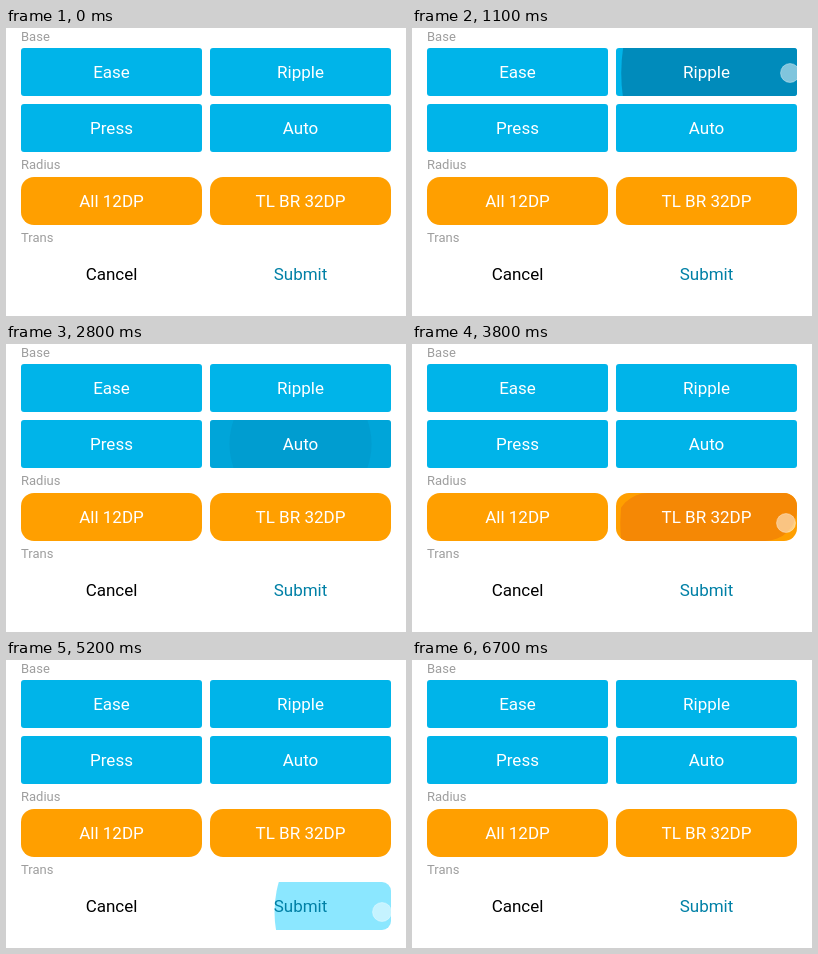
An HTML page for the animation above (6.8 s loop, 400x288 px).

```html
<!DOCTYPE html>
<html lang="en">
<head>
<meta charset="utf-8">
<title>Button touch effects</title>
<style>
  html, body { margin: 0; width: 100%; height: 100%; overflow: hidden; background: #fff; }
  svg { display: block; width: 400px; height: 288px; font-family: Roboto, Arial, sans-serif; }
  .label { font-size: 13px; fill: #9e9e9e; }
  .caption { font-size: 17px; text-anchor: middle; }
</style>
</head>
<body>
<svg id="stage" viewBox="0 0 400 288"></svg>
<script>
const LOOP = 6800, STEP = 100, GROW = 500;
const W = 181, H = 48;
const LEFT = 15, RIGHT = 204;
const BLUE = { fill: '#00b4e9', ink: '#008bbb', text: '#fff', corners: [3, 3, 3, 3] };
const ORANGE = { fill: '#ff9f00', ink: '#f58805', text: '#fff', corners: [13, 13, 13, 13] };
const CANCEL = { fill: 'none', ink: '#d6d6d6', text: '#000', corners: [9, 0, 0, 9] };
const SUBMIT = { fill: 'none', ink: '#8be7ff', text: '#0080a6', corners: [0, 9, 9, 0] };

// taps: [down, up, end of fade, finger x, finger y]
const buttons = [
  { name: 'Ease', x: LEFT, y: 20, look: BLUE, effect: 'ease', taps: [[100, 300, 500, 150, 46]] },
  { name: 'Ripple', x: RIGHT, y: 20, look: BLUE, effect: 'ripple', taps: [[700, 1150, 1450, 378, 45]] },
  { name: 'Press', x: LEFT, y: 76, look: BLUE, effect: 'press', taps: [[1500, 1950, 2350, 160, 102]] },
  { name: 'Auto', x: RIGHT, y: 76, look: BLUE, effect: 'auto', taps: [[2250, 2650, 2950, 366, 102]] },
  { name: 'All 12DP', x: LEFT, y: 149, look: ORANGE, effect: 'ripple', taps: [[2850, 3200, 3500, 168, 176]] },
  { name: 'TL BR 32DP', x: RIGHT, y: 149, look: ORANGE, effect: 'ripple', clip: [32, 13, 32, 13],
    taps: [[3400, 3850, 4200, 374, 179]] },
  { name: 'Cancel', x: LEFT, y: 222, look: CANCEL, effect: 'ripple', taps: [[4250, 4650, 4950, 170, 250]] },
  { name: 'Submit', x: RIGHT, y: 222, look: SUBMIT, effect: 'ripple',
    taps: [[5010, 5450, 5800, 376, 252], [6150, 6430, 6700, 340, 250]] }
];

const stage = document.getElementById('stage');

function add(parent, tag, attrs, text) {
  const el = document.createElementNS('http://www.w3.org/2000/svg', tag);
  set(el, attrs);
  if (text) el.textContent = text;
  parent.append(el);
  return el;
}

function set(el, attrs) {
  for (const key in attrs) el.setAttribute(key, attrs[key]);
}

// Corner radii run clockwise from top left.
function roundBox(x, y, [tl, tr, br, bl]) {
  return `M${x + tl} ${y}H${x + W - tr}a${tr} ${tr} 0 0 1 ${tr} ${tr}` +
    `V${y + H - br}a${br} ${br} 0 0 1 ${-br} ${br}` +
    `H${x + bl}a${bl} ${bl} 0 0 1 ${-bl} ${-bl}` +
    `V${y + tl}a${tl} ${tl} 0 0 1 ${tl} ${-tl}Z`;
}

function build(b, i) {
  const { x, y, look } = b;
  const box = roundBox(x, y, look.corners);
  add(stage, 'path', { d: box, fill: look.fill });
  const clip = add(stage, 'clipPath', { id: 'clip' + i });
  add(clip, 'path', { d: b.clip ? roundBox(x, y, b.clip) : box });
  const group = add(stage, 'g', { 'clip-path': `url(#clip${i})`, fill: look.ink });
  b.shade = add(group, 'rect', { x, y, width: W, height: H, opacity: 0 });
  b.wave = add(group, 'circle', { opacity: 0 });
  add(stage, 'text', { class: 'caption', x: x + W / 2, y: y + 30, fill: look.text }, b.name);
}

[['Base', 13], ['Radius', 141], ['Trans', 214]].forEach(([text, y]) =>
  add(stage, 'text', { class: 'label', x: LEFT, y }, text));
buttons.forEach(build);
const finger = add(stage, 'circle', {
  r: 9.5, fill: '#fff', 'fill-opacity': 0.5, stroke: '#fff', 'stroke-opacity': 0.35, opacity: 0
});

const clamp = v => Math.max(0, Math.min(1, v));
const easeOut = v => 1 - (1 - v) ** 2;
const mix = (a, b, p) => a + (b - a) * p;

function drawButton(b, t) {
  const tap = b.taps.find(([down, , end]) => t >= down && t < end);
  if (!tap) {
    set(b.shade, { opacity: 0 });
    set(b.wave, { opacity: 0 });
    return;
  }
  const [down, up, end, fx, fy] = tap;
  const grown = easeOut(clamp((t - down) / GROW));
  const alpha = 1 - clamp((t - up) / (end - up));
  const cx = b.x + W / 2, cy = b.y + H / 2;
  let shade = 0, wave = alpha, x = fx, y = fy, r;

  if (b.effect === 'ease') {
    shade = alpha * clamp((t - down + 80) / 200);
    wave = r = 0;
  } else if (b.effect === 'ripple') {
    r = grown * Math.hypot(Math.abs(fx - cx) + W / 2, Math.abs(fy - cy) + H / 2);
  } else {
    const auto = b.effect === 'auto';
    x = mix(fx, cx, grown);
    y = mix(fy, cy, grown);
    r = grown * (auto ? 71 : 78.5);
    if (auto) {
      shade = 0.7 * alpha * grown;
      wave = 0.6 * alpha;
    }
  }
  set(b.shade, { opacity: shade });
  set(b.wave, { cx: x, cy: y, r, opacity: wave });
  if (t < up) set(finger, { cx: fx, cy: fy, opacity: 1 });
}

const start = performance.now();
function frame() {
  const t = Math.floor((performance.now() - start) % LOOP / STEP) * STEP;
  set(finger, { opacity: 0 });
  buttons.forEach(b => drawButton(b, t));
  requestAnimationFrame(frame);
}
frame();
</script>
</body>
</html>
```
